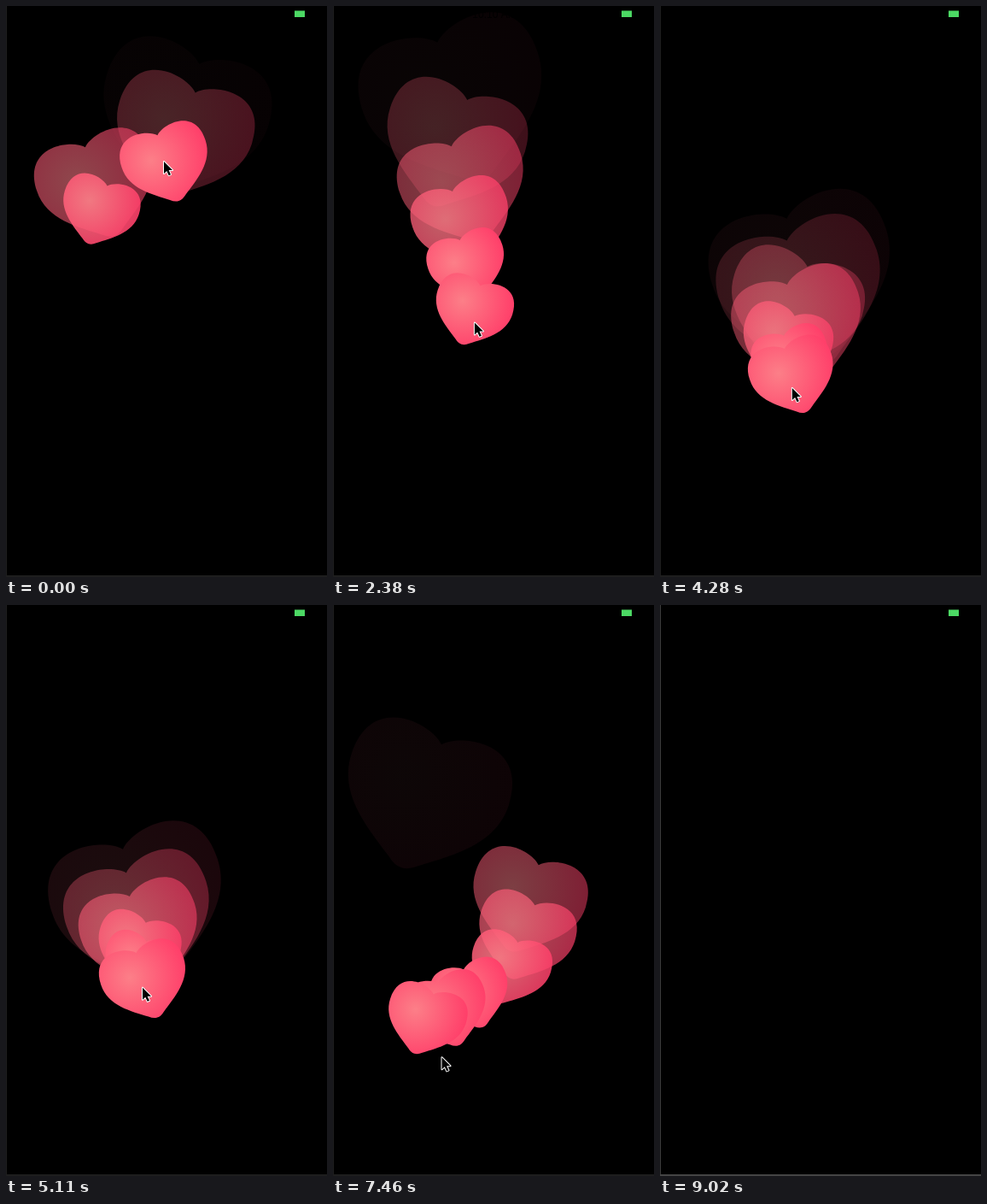
These frames come from a looping animation (376 by 668 pixels, 9070 ms). An HTML page with a canvas:

```html
<!DOCTYPE html>
<html lang="en">
<head>
<meta charset="utf-8">
<title>Floating hearts</title>
<style>
html, body { margin: 0; width: 100%; height: 100%; overflow: hidden; background: #000; }
canvas { display: block; }
</style>
</head>
<body>
<canvas id="stage" width="376" height="668"></canvas>
<script>
const ctx = document.getElementById('stage').getContext('2d');
const LOOP = 9070, STEP = 118.3, LAST_STEP = 74, END = 9020;
const FADE = 950, LIFE = 1.47, RISE = 76, GROW = 1.55, TILT = Math.PI / 10;

// Pointer strokes; each sign drops one heart leaning that way, evenly in time
const strokes = [
  { from: -1350, to: -530, lean: '++-+', points: [[212, 235], [210, 236], [103, 271], [112, 280]] },
  { from: 0, to: 440, lean: '--+', points: [[185, 182], [186, 195], [217, 238]] },
  { from: 1030, to: 2200, lean: '-+---+', points: [[138, 214], [150, 270], [148, 310], [166, 368]] },
  { from: 2940, to: 3365, lean: '--+-', points: [[164, 418], [160, 443]] },
  { from: 3614, to: 4952, lean: '+---++-', points: [[150, 446], [160, 448]] },
  { from: 5180, to: 6000, lean: '+-+-+', points: [[160, 447], [160, 447], [165, 440], [258, 300], [205, 230]] },
  { from: 6140, to: 6140, lean: '+', points: [[113, 326]] },
  { from: 6585, to: 7355, lean: '+++--+', points: [[231, 414], [226, 462], [143, 492], [111, 491]] },
  { from: 7460, to: 7720, lean: '', points: [[130, 535], [160, 690]] }
];

const mix = (a, b, k) => a.map((v, i) => v + (b[i] - v) * k);

function along(points, k) {
  const pos = k * (points.length - 1), i = Math.floor(pos);
  return mix(points[i], points[i + 1] || points[i], pos - i);
}

function pointer(t) {
  const i = strokes.findLastIndex(s => s.from <= t);
  const { from, to, points } = strokes[i], next = strokes[i + 1];
  if (t < to) return along(points, (t - from) / (to - from));
  if (!next) return along(points, 1);
  const k = (t - to) / (next.from - to);
  return mix(along(points, 1), next.points[0], k * k);
}

const hearts = strokes.flatMap(({ from, to, lean, points }) => [...lean].map((sign, i) => {
  const k = i / Math.max(1, lean.length - 1);
  const [x, y] = along(points, k);
  return { born: from + (to - from) * k, x, y, dir: sign === '+' ? 1 : -1 };
}));

const half = s => `C${10 * s} -44 ${54 * s} -52 ${54 * s} -9 C${54 * s} 19 ${28 * s} 34 ${10 * s} 47 Q${5 * s} 51.4 0 51.4`;
const heartShape = new Path2D(`M0 -33 ${half(1)} L0 -33 ${half(-1)} Z`);
const arrow = new Path2D('M0 0V14L3.3 11L5.7 16.2L8 15.2L5.6 10H10Z');
const glow = ctx.createRadialGradient(-17, -6, 0, -17, -6, 72);
glow.addColorStop(0, '#fc7f88');
glow.addColorStop(1, '#ff3e69');

function drawHeart({ born, x, y, dir }, t) {
  const age = t - born, used = age / FADE, left = Math.min(1, LIFE - used);
  if (age < 0 || left <= 0) return;
  const pop = 1 + .17 * Math.max(0, 1 - (age / 450) ** 2);
  const scale = (85 - 4 * dir) / 109 * pop * (1 + GROW * (1 - left));
  ctx.save();
  ctx.translate(x, y - RISE * used);
  ctx.rotate(dir * TILT);
  ctx.scale(scale, scale);
  ctx.translate(-2.5 * dir, 0);
  ctx.globalAlpha = left ** 1.2;
  ctx.fillStyle = glow;
  ctx.fill(heartShape);
  ctx.restore();
}

function rect(color, ...box) {
  ctx.fillStyle = color;
  ctx.fillRect(...box);
}

function draw(time) {
  const ended = time >= END;
  const t = Math.min(LAST_STEP, Math.floor(time / STEP)) * STEP;
  rect('#000', 0, 0, 376, 668);
  if (!ended) hearts.forEach(h => drawHeart(h, t));

  ctx.fillStyle = '#000';
  ctx.font = '12px "Liberation Sans", Arial, sans-serif';
  ctx.textAlign = 'center';
  ctx.fillText('10:10 AM', 189, 14);
  rect('#4cd964', 338, 5.5, 12, 7.5);
  rect(ended ? '#3c3c3c' : '#1e1e1e', 0, 0, 1, 668);
  rect(ended ? '#444' : '#1e1e1e', 0, 666, 376, 2);

  if (ended) return;
  ctx.save();
  ctx.translate(...pointer(t));
  ctx.lineWidth = 2;
  ctx.lineJoin = 'round';
  ctx.strokeStyle = '#fff';
  ctx.stroke(arrow);
  ctx.fillStyle = '#000';
  ctx.fill(arrow);
  ctx.restore();
}

const start = performance.now();
(function tick() {
  draw((performance.now() - start) % LOOP);
  requestAnimationFrame(tick);
})();
</script>
</body>
</html>
```
